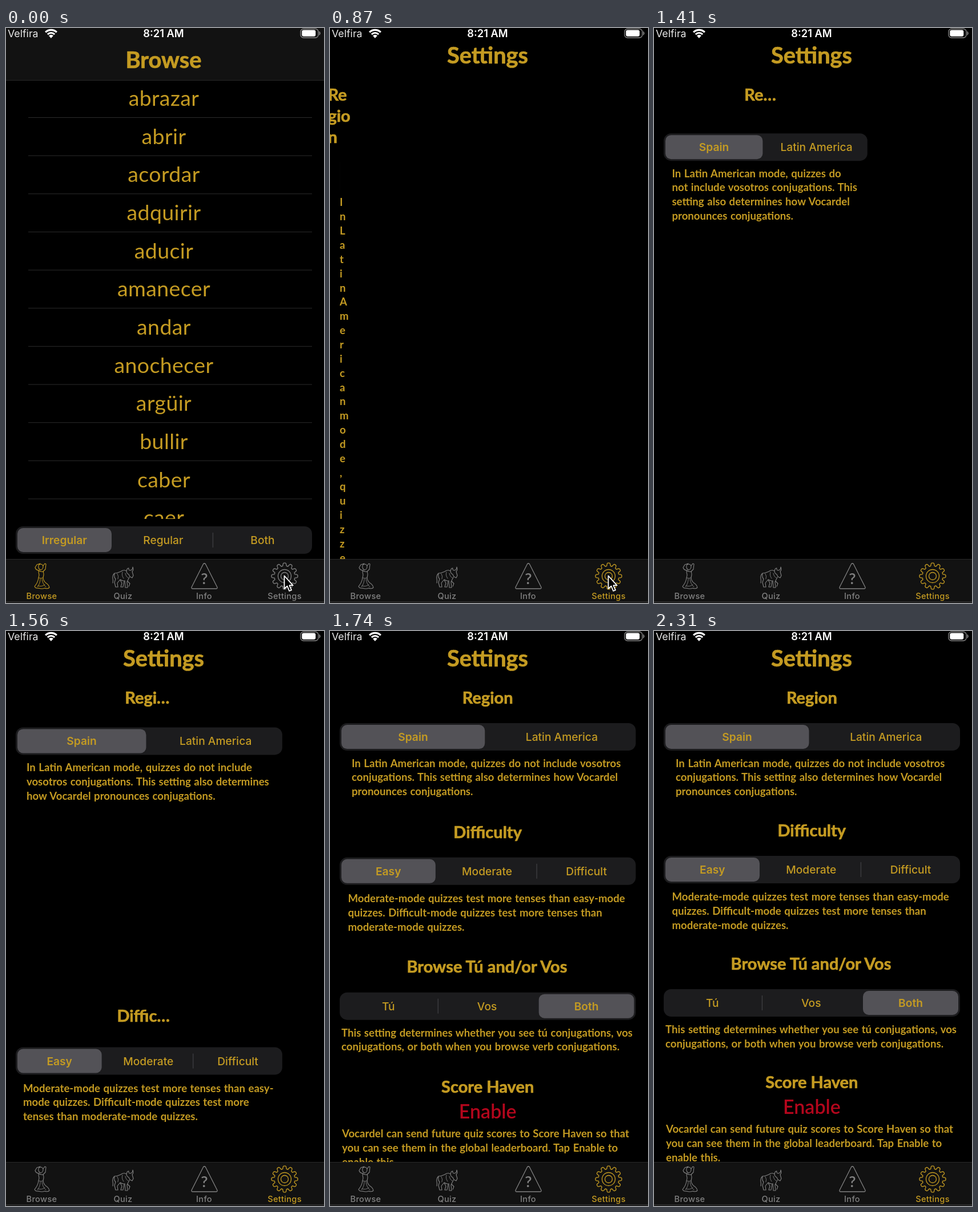
These frames come from a looping animation (557 px wide and 1005 px high, 2.34 s). An HTML page:

```html
<!DOCTYPE html>
<html lang="en">
<head>
<meta charset="utf-8">
<title>Verb browser</title>
<style>
  html, body { margin: 0; width: 100%; height: 100%; overflow: hidden; background: #000; }
  svg { display: block; }
</style>
</head>
<body>
<svg id="stage" width="557" height="1005" viewBox="0 0 557 1005"></svg>
<script>
const LOOP = 2340, STEP = 30;
const SWITCH = 859, GROW = 900, CURSOR_END = 1290;
const GOLD = '#c49b22', GRAY = '#818181', RED = '#b3061c';
const LEFT = 17, FULL = 519;

const LATO = 'Lato, Open Sans, sans-serif';
const UI = 'Inter, Roboto, sans-serif';
const FONT = {
  title: `700 39.8px ${LATO}`,
  row: `400 37.5px ${LATO}`,
  head: `700 29px ${LATO}`,
  note: `700 18.6px ${LATO}`,
  button: `600 34px ${LATO}`,
  segment: `500 19.2px ${UI}`,
  selected: `600 19.2px ${UI}`,
  tab: `500 14.6px ${UI}`
};
const HEAVY = `stroke="${GOLD}" stroke-width="0.7"`;
const HEAD_LINE = 37, NOTE_LINE = 24.85, NOTE_SLACK = 4.6, HEAD_MIN = 41;

const VERBS = ['abrazar', 'abrir', 'acordar', 'adquirir', 'aducir', 'amanecer', 'andar',
  'anochecer', 'argüir', 'bullir', 'caber', 'caer'];

// "extra" values are how far down each part sits while the column has no width.
const SECTIONS = [
  { head: 'Region', headY: 127, headExtra: 0, headLines: 2,
    options: ['Spain', 'Latin America'], chosen: 0, controlY: 161,
    extra: 74, noteX: 38, noteY: 237.5,
    note: ['In Latin American mode, quizzes do not include vosotros',
      'conjugations. This setting also determines how Vocardel',
      'pronounces conjugations.'] },
  { head: 'Difficulty', headY: 359, headExtra: 3230, headLines: 3,
    options: ['Easy', 'Moderate', 'Difficult'], chosen: 0, controlY: 393,
    extra: 3333, noteX: 31.5, noteY: 471,
    note: ['Moderate-mode quizzes test more tenses than easy-mode',
      'quizzes. Difficult-mode quizzes test more tenses than',
      'moderate-mode quizzes.'] },
  { head: 'Browse Tú and/or Vos', headY: 592, headExtra: 6375, headLines: 7,
    options: ['Tú', 'Vos', 'Both'], chosen: 2, controlY: 626,
    extra: 6632, noteX: 20, noteY: 703,
    note: ['This setting determines whether you see tú conjugations, vos',
      'conjugations, or both when you browse verb conjugations.'] },
  { head: 'Score Haven', headY: 799, headExtra: 9350, headLines: 4,
    button: 'Enable', buttonY: 844,
    extra: 9500, noteX: 21, noteY: 877,
    note: ['Vocardel can send future quiz scores to Score Haven so that',
      'you can see them in the global leaderboard. Tap Enable to',
      'enable this.'] }
];

const stage = document.getElementById('stage');
const pen = document.createElement('canvas').getContext('2d');

function measure(s, font) {
  pen.font = font;
  const spaces = font === FONT.note ? s.split(' ').length - 1 : 0;
  return pen.measureText(s).width + spaces;
}

function text(s, x, y, font, fill = GOLD, anchor = 'middle', more = '') {
  const gap = font === FONT.note ? ';word-spacing:1px' : '';
  return `<text x="${x}" y="${y}" fill="${fill}" text-anchor="${anchor}" style="font:${font}${gap}" ${more}>${s}</text>`;
}

function rect(x, y, w, h, fill, r = 0, more = '') {
  return `<rect x="${x}" y="${y}" width="${Math.max(0, w)}" height="${h}" rx="${r}" fill="${fill}" ${more}/>`;
}

function path(d, stroke, width = 1.1, fill = 'none', cap = 'round') {
  return `<path d="${d}" stroke="${stroke}" stroke-width="${width}" fill="${fill}" stroke-linejoin="round" stroke-linecap="${cap}"/>`;
}

// Breaks after spaces and hyphens, and inside words that are too long.
function wrap(s, font, max) {
  const fits = part => measure(part.trimEnd(), font) <= max;
  const lines = [];
  let line = '';
  for (const word of s.split(/(?<=[ -])/)) {
    if (fits(line + word)) { line += word; continue; }
    if (line) lines.push(line);
    line = word;
    while (!fits(line) && line.trimEnd().length > 1) {
      let n = line.length - 1;
      while (n > 1 && !fits(line.slice(0, n))) n--;
      lines.push(line.slice(0, n));
      line = line.slice(n);
    }
  }
  return [...lines, line];
}

function shorten(s, font, max, reserve) {
  if (measure(s, font) <= max) return s;
  while (s && measure(s, font) + reserve > max) s = s.slice(0, -1);
  return s.trim() + '…';
}

function easeInOut(x) {
  if (x <= 0) return 0;
  if (x >= 1) return 1;
  let lo = 0, hi = 1;
  for (let i = 0; i < 24; i++) {
    const s = (lo + hi) / 2;
    if (1.26 * s - 0.78 * s * s + 0.52 * s ** 3 < x) lo = s; else hi = s;
  }
  return lo * lo * (3 - 2 * lo);
}

function control(options, chosen, y, width) {
  const cell = width / options.length, last = options.length - 1;
  let out = rect(LEFT, y, width, 48, '#1c1c1e', Math.min(13, width / 2));
  const x0 = LEFT + chosen * cell + 3;
  const x1 = LEFT + (chosen + 1) * cell - (chosen === last ? 3 : 5);
  out += rect(x0, y + 3, x1 - x0, 42, '#535257', 10);
  options.forEach((label, i) => {
    const font = i === chosen ? FONT.selected : FONT.segment;
    const x = LEFT + (i + 0.5) * cell - (i < last ? 1.2 : 0);
    if (cell > 26) out += text(shorten(label, font, cell - 14, 15), x, y + 31, font);
    if (i && i !== chosen && i - 1 !== chosen)
      out += rect(LEFT + i * cell - 1.2, y + 11, 1.3, 26, '#3f3f42');
  });
  return out;
}

function heading(section, p) {
  const width = measure(section.head, FONT.head);
  const box = HEAD_MIN + (width - HEAD_MIN) * p + 0.3;
  const x = LEFT + FULL / 2 * p - box / 2;
  const y = section.headY + section.headExtra * (1 - p);
  const room = 1 + Math.floor(section.headLines * (1 - p) + 0.001);
  let lines = wrap(section.head, FONT.head, box);
  if (lines.length > room) {
    const rest = lines.slice(room - 1).join('');
    lines = [...lines.slice(0, room - 1), shorten(rest, FONT.head, box, 28)];
  }
  return lines.map((s, i) => text(s, x, y + i * HEAD_LINE, FONT.head, GOLD, 'start', HEAVY)).join('');
}

function note(section, p) {
  const top = section.noteY + section.extra * (1 - p);
  if (top > 960) return '';
  const full = Math.max(...section.note.map(s => measure(s, FONT.note))) + NOTE_SLACK;
  const x = LEFT + (section.noteX - LEFT) * p;
  return wrap(section.note.join(' '), FONT.note, full * p)
    .map((s, i) => [s, top + i * NOTE_LINE])
    .filter(([, y]) => y < 960)
    .map(([s, y]) => text(s, x, y, FONT.note, GOLD, 'start')).join('');
}

function settings(p) {
  let out = text('Settings', 276, 61.5, FONT.title, GOLD, 'middle', HEAVY);
  for (const s of SECTIONS) {
    const drop = s.extra * (1 - p);
    if (s.headY + s.headExtra * (1 - p) < 980) out += heading(s, p);
    if (s.options && s.controlY + drop < 960) out += control(s.options, s.chosen, s.controlY + drop, FULL * p);
    if (s.button && s.buttonY + drop < 980)
      out += text(s.button, LEFT + FULL / 2 * p, s.buttonY + drop, FONT.button, RED);
    out += note(s, p);
  }
  return out;
}

function browse() {
  let out = rect(0, 0, 557, 91, '#121212') + rect(0, 91, 557, 1, '#262626');
  out += text('Browse', 276, 69.5, FONT.title, GOLD, 'middle', HEAVY);
  VERBS.forEach((verb, i) => {
    const y = 136 + i * 66.65;
    out += text(verb, 276.5, y, FONT.row, GOLD, 'middle', 'letter-spacing="0.4"');
    if (i < VERBS.length - 1) out += rect(39, y + 20, 497, 1, '#2b2b2b');
  });
  out += rect(0, 858, 557, 70, '#000');
  return out + control(['Irregular', 'Regular', 'Both'], 0, 871, FULL);
}

function statusBar() {
  const arc = (r, w) => {
    const dx = r * 0.7, y = 17.4 - r * 0.72;
    return path(`M${79 - dx} ${y}A${r} ${r} 0 0 1 ${79 + dx} ${y}`, '#fff', w, 'none', 'butt');
  };
  return text('Velfira', 3, 16, `400 17.8px ${UI}`, '#e8e8e8', 'start') +
    arc(14, 3.3) + arc(8.8, 3.1) + path('M75.4 13.4Q79 10.8 82.6 13.4L79 17.4Z', '#fff', 0.5, '#fff') +
    text('8:21 AM', 276, 16, `600 18.3px ${UI}`, '#fff') +
    rect(516, 1.5, 31, 15.5, 'none', 5, 'stroke="#8a8a8a" stroke-width="1.3"') +
    rect(518.3, 3.6, 24, 11.2, '#fff', 3) +
    path('M549.3 6.5Q551.6 9.2 549.3 12Z', '#8a8a8a', 1, '#8a8a8a');
}

function dancer(c) {
  return path('M57 943q-1-5 3-6q5 0 5 5q-1 5-4 5q-3 0-4-4M57 948q-5-1-6-5l3-5l6-2M65 940l3-4l2 1l-1 9l-4 4', c) +
    path('M57 948q0 4 1 8l-1 5q-1 8-7 15q2 4 7 3q6 2 11 0q5 2 8-1q-1-5-6-8q-5-4-5-10q2-5 0-10q-4 1-8-2', c) +
    path('M57 961q4 2 8 0M60 963q0 8-5 14M63 963q1 9 7 14M56 975q7 2 12-2', c, 0.9);
}

function bull(c) {
  return path('M211 949q-5-3-10 1q-6 3-11 3q-4 4-3 10q1 3 0 7M190 954q-1 6 2 9l-2 6l2 8h4l-1-7l5-6q4 3 8 2l1 12h4l-1-10l4-8', c) +
    path('M211 949q1-5 4-5q-1 4 3 4q4-1 4-6q2 5-1 8l2 7l-2 4l-4-2l-2-4q-4-2-4-6M200 965l3 5l-2 7h4l2-10M213 967l4 4l-2 5', c) +
    path('M204 951q-2 6 2 11M209 953q1 6 5 8M195 954q3 4 1 9', c, 0.9);
}

function gear(c) {
  const points = [];
  for (let i = 0; i < 12; i++)
    for (const [turn, r] of [[-0.36, 18], [-0.22, 22], [-0.12, 23], [0.12, 23], [0.22, 22], [0.36, 18]]) {
      const a = (i + turn) * Math.PI / 6;
      points.push(`${(488 + r * Math.sin(a)).toFixed(2)} ${(958 - r * Math.cos(a)).toFixed(2)}`);
    }
  const ring = r => `<circle cx="488" cy="958" r="${r}" fill="none" stroke="${c}" stroke-width="1.3"/>`;
  return path(`M${points.join('L')}Z`, c, 1.3) + ring(11.5) + ring(6.5);
}

function warning(c) {
  return path('M345.5 937Q347.5 934.5 349.5 937L370 977.5Q370.5 980 368 980H327Q324.5 980 325 977.5Z', c, 1.3) +
    text('?', 347.5, 971.5, `600 27px ${LATO}`, c);
}

function tabBar(active) {
  const tabs = [['Browse', 62.5, dancer], ['Quiz', 205, bull], ['Info', 347, warning], ['Settings', 488, gear]];
  return rect(0, 928, 557, 77, '#121212') + rect(0, 928, 557, 1, '#282828') +
    rect(0, 1002.5, 557, 1.2, '#3c3c3c') +
    tabs.map(([name, x, icon]) => {
      const color = name === active ? GOLD : GRAY;
      return icon(color) + text(name, x, 997.5, FONT.tab, color, 'middle', 'letter-spacing="0.3"');
    }).join('');
}

function cursor() {
  return path('M487.5 957.5V980L492.6 975.4L496.2 984L500 982.4L496.4 974.2H502.6Z', '#fff', 1.8, '#000');
}

function render(t) {
  const open = t >= SWITCH;
  stage.innerHTML = rect(0, 0, 557, 1005, '#000') +
    (open ? settings(easeInOut((t - SWITCH) / GROW)) : browse()) +
    statusBar() + tabBar(open ? 'Settings' : 'Browse') +
    (t < CURSOR_END ? cursor() : '');
}

const start = performance.now();
let shown = -1;
function tick() {
  const t = Math.floor((performance.now() - start) % LOOP / STEP) * STEP;
  if (t !== shown) render(shown = t);
  requestAnimationFrame(tick);
}
tick();
</script>
</body>
</html>
```
